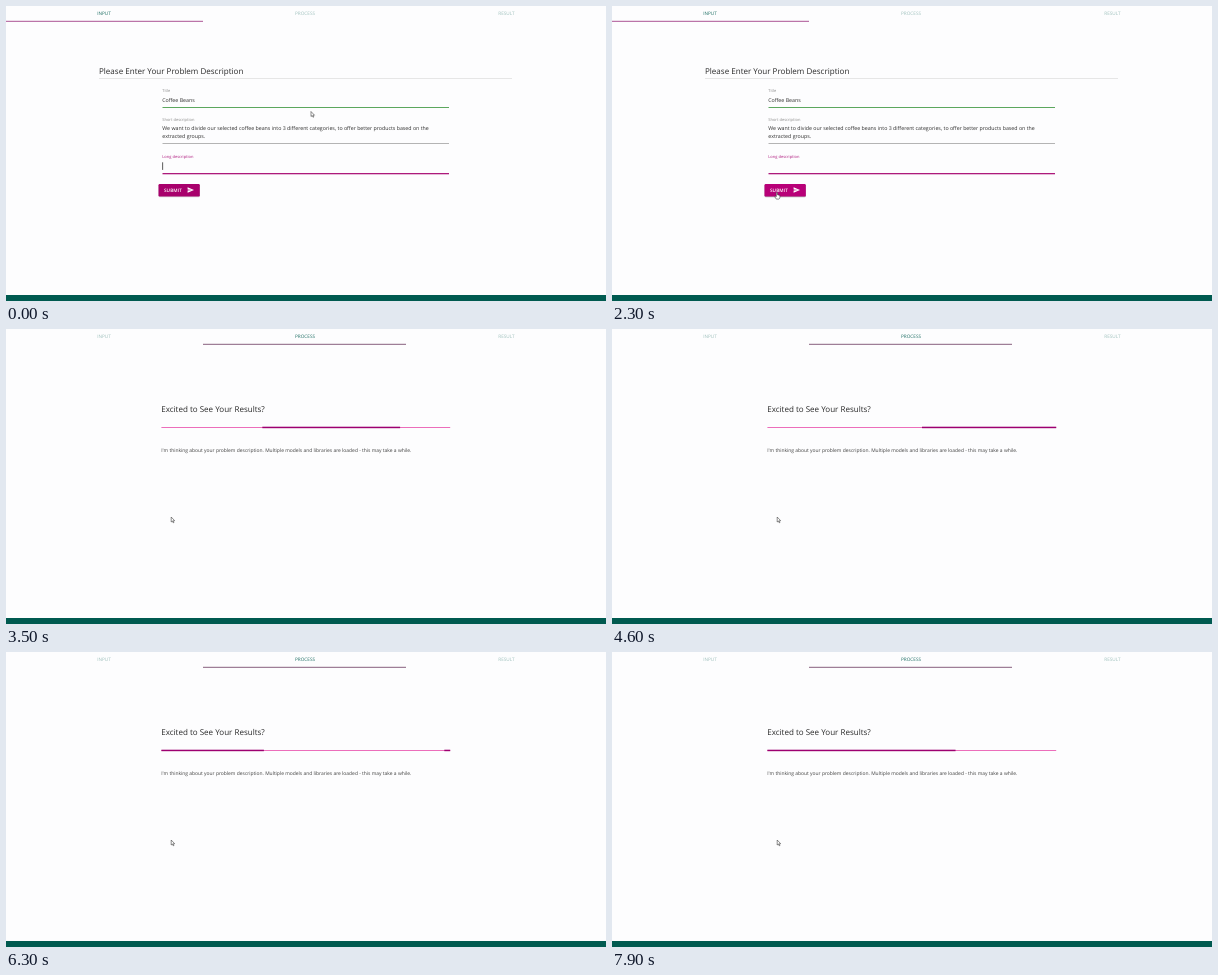
Recreate the animation shown at these times as an HTML page. Size 600 px wide and 295 px high, loop 8 s.

```html
<!DOCTYPE html>
<html lang="en">
<head>
<meta charset="utf-8">
<title>Problem description form</title>
<style>
html, body { margin: 0; width: 100%; height: 100%; overflow: hidden; background: #fdfdfe; }
svg { display: block; width: 600px; height: 295px; }
text {
  font-family: "Open Sans", "Noto Sans", sans-serif;
  font-size: 5.28px;
  fill: #303030;
  text-rendering: geometricPrecision;
}
.heading { font-size: 8.04px; fill: #2a2a2a; }
.label { font-size: 4px; fill: #8c8c8c; }
.focus { fill: #b01e80; }
.note { font-size: 4.94px; fill: #404040; }
.tab { font-size: 4.7px; fill: #1d6e64; text-anchor: middle; }
.submit { font-size: 4.7px; font-weight: 600; letter-spacing: .1px; fill: #fff; }
</style>
</head>
<body>
<svg viewBox="0 0 600 295">
  <rect width="600" height="295" fill="#fdfdfe"/>
  <rect y="289" width="600" height="6" fill="#005a50"/>

  <text class="tab" id="tabInput" x="98" y="9.3">INPUT</text>
  <text class="tab" id="tabProcess" x="299" y="9.3">PROCESS</text>
  <text class="tab" x="500.5" y="9.3" opacity=".42">RESULT</text>
  <rect id="slider" y="14.8" width="197" height="1"/>

  <g id="form">
    <text class="heading" x="93" y="67.9">Please Enter Your Problem Description</text>
    <rect x="93" y="72" width="413" height="1" fill="#e6e6e6"/>
    <text class="label" x="156.3" y="86.2">Title</text>
    <text x="156.3" y="96">Coffee Beans</text>
    <rect x="156.5" y="101" width="286.5" height="1" fill="#5ca75e"/>
    <text class="label" x="156.3" y="115.3">Short description</text>
    <text x="156.3" y="124.3">We want to divide our selected coffee beans into 3 different categories, to offer better products based on the</text>
    <text x="156.3" y="131.7">extracted groups.</text>
    <rect x="156.5" y="137" width="286.5" height="1" fill="#b4b4b4"/>
    <text class="label focus" x="156.3" y="152.3">Long description</text>
    <rect id="caret" x="156.3" y="156.3" width=".8" height="7.6" fill="#333"/>
    <rect x="156.5" y="167" width="286.5" height="1.3" fill="#ad1a7b"/>
    <rect id="shadow" x="152.5" y="179" width="41.5" height="12.3" rx="1.5" fill="#000"/>
    <rect id="button" x="152.5" y="178" width="41.3" height="12.4" rx="1.2"/>
    <text class="submit" x="157.9" y="185.9">SUBMIT</text>
    <path d="M181.6 181.2 188 184 181.6 186.8V184.6L186.2 184 181.6 183.4Z" fill="#fff"/>
  </g>

  <g id="process">
    <text class="heading" x="155.2" y="83">Excited to See Your Results?</text>
    <rect x="155.4" y="98" width="288.8" height="1" fill="#ec6ebb"/>
    <g fill="#9d0070">
      <rect id="long" y="97.7" height="1.5"/>
      <rect id="short" y="97.7" height="1.5"/>
    </g>
    <text class="note" x="155.2" y="123.2">I'm thinking about your problem description. Multiple models and libraries are loaded - this may take a while.</text>
  </g>

  <g id="cursor" fill="#fff" stroke="#333" stroke-width=".55" stroke-linejoin="round">
    <path id="arrow" d="M0 0V5L1.15 4 2 5.8 2.8 5.4 2 3.7H3.5Z"/>
    <path id="hand" d="M-.6 .3Q0 -.4 .6 .3V2.4L3 3V5Q2.8 6.4 2 6.7H-.6L-2.2 4.2Q-2 3.4 -.6 4.3Z"/>
  </g>
</svg>
<script>
const LOOP = 8000, SWAP = 2350, BAR_START = 2407, SPEED = 1.4;
const $ = id => document.getElementById(id);
const clamp = v => Math.min(1, Math.max(0, v));
const mix = (a, b, k) => a + (b - a) * k;
const mixColor = (a, b, k) => `rgb(${a.map((v, i) => Math.round(mix(v, b[i], k)))})`;
const show = (id, on) => $(id).setAttribute('visibility', on ? 'visible' : 'hidden');
const set = (id, attrs) => {
  for (const name in attrs) $(id).setAttribute(name, attrs[name]);
};

function bezier(x1, y1, x2, y2) {
  const at = (a, b, s) => 3 * (1 - s) ** 2 * s * a + 3 * (1 - s) * s * s * b + s ** 3;
  return x => {
    if (x <= 0 || x >= 1) return clamp(x);
    let lo = 0, hi = 1;
    for (let i = 0; i < 24; i++) {
      const mid = (lo + hi) / 2;
      if (at(x1, x2, mid) < x) lo = mid; else hi = mid;
    }
    return at(y1, y2, lo);
  };
}
const longEase = bezier(.65, .815, .735, .395);
const shortEase = bezier(.165, .84, .44, 1);
const slideEase = bezier(.64, .09, .08, 1);
const moveEase = bezier(.42, 0, .4, 1);

// Each bar travels during the first 60% of a 2.1 s cycle.
function drawBar(id, age, ease, from, to) {
  const k = age < 0 ? 0 : ease(age % 2100 / 1260);
  const left = clamp(mix(from[0], to[0], k));
  const right = clamp(mix(from[1], to[1], k));
  set(id, { x: 155.4 + 288.8 * left, width: 288.8 * Math.max(0, right - left) });
}

function render(t) {
  const onForm = t < SWAP;
  show('form', onForm);
  show('process', !onForm);

  const slide = slideEase((t - 2305) / 214);
  set('slider', {
    x: 197 * slide,
    width: mix(197, 203, slide),
    fill: mixColor([172, 84, 148], [136, 96, 126], slide)
  });
  const tab = clamp((t - 2330) / 200);
  set('tabInput', { opacity: mix(1, .42, tab) });
  set('tabProcess', { opacity: mix(.42, 1, tab) });

  show('caret', onForm && Math.floor((t + 217) / 357.2) % 2 === 0);

  const move = moveEase((t - 650) / 900);
  set('cursor', { transform: `translate(${mix(305, 165.2, move)} ${mix(105.5, 188, move)})` });
  const hover = clamp((t - 1450) / 150);
  const hand = t >= 1450 && t < 2450;
  show('hand', hand);
  show('arrow', !hand);
  set('hand', { transform: 'translate(-.3 -1.6)' });
  set('button', { fill: mixColor([168, 0, 108], [184, 0, 120], hover) });
  set('shadow', { opacity: mix(.16, .3, hover) });

  const age = (t - BAR_START) * SPEED;
  drawBar('long', age, longEase, [-.35, 0], [1, 1.9]);
  drawBar('short', age - 1150, shortEase, [-2, 0], [1.07, 1.08]);
}

const start = performance.now();
function tick() {
  render((performance.now() - start) % LOOP);
  requestAnimationFrame(tick);
}
tick();
</script>
</body>
</html>
```
